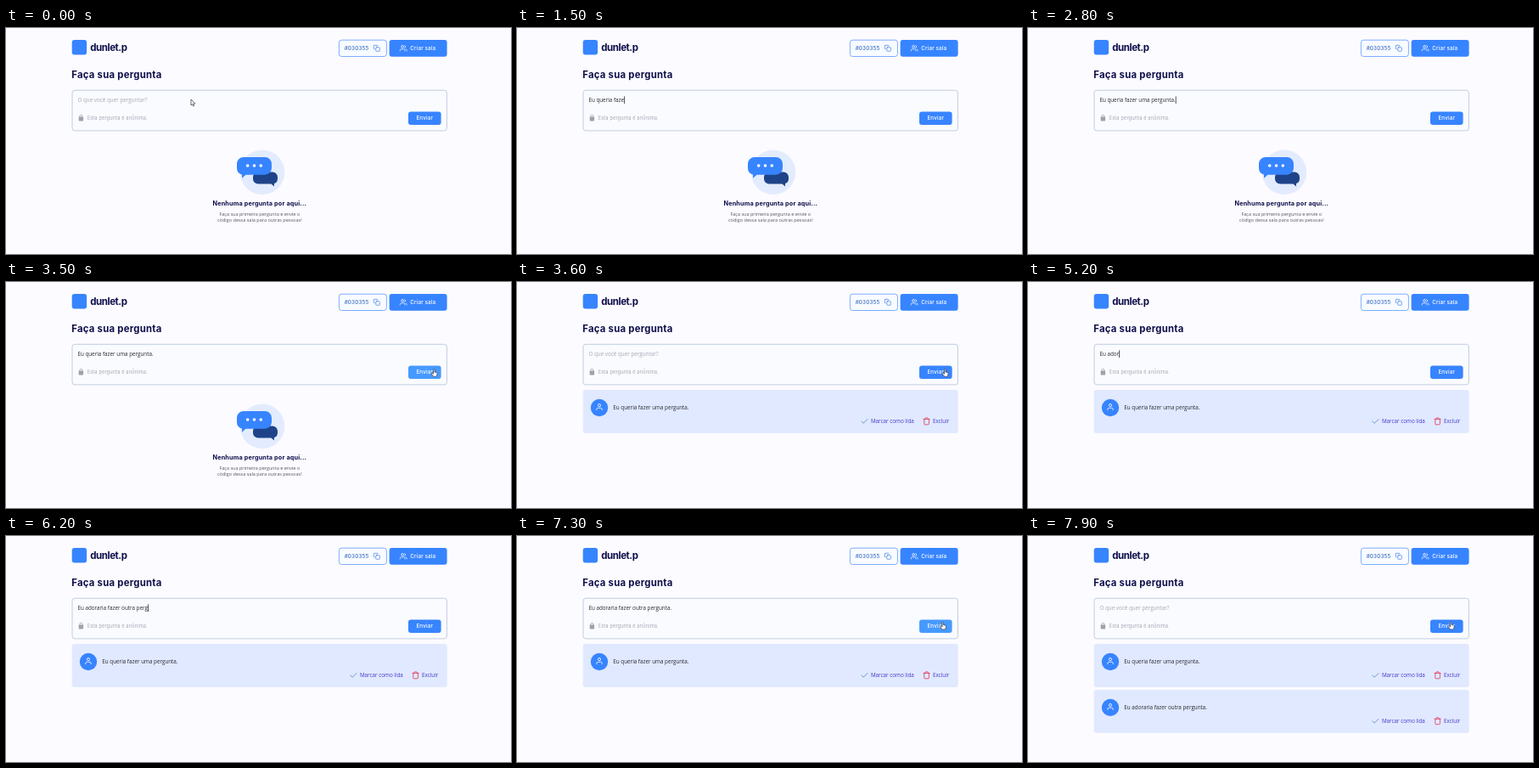
Recreate the animation shown at these times as an HTML page. Size 595 px wide and 266 px high, loop 8000 ms.

```html
<!DOCTYPE html>
<html lang="pt-BR">
<head>
<meta charset="utf-8">
<title>Perguntas</title>
<style>
  html, body { margin: 0; width: 100%; height: 100%; overflow: hidden; background: #fcfbff; }
  svg { display: block; width: 100%; height: 100%; }
  text { font: 6.31px "Open Sans", "Noto Sans", sans-serif; fill: #29292e; white-space: pre; }
  .ui { font-family: Inter, sans-serif; font-weight: 500; letter-spacing: .15px; }
  .title { font: 700 11.3px Inter, sans-serif; letter-spacing: .28px; fill: #0f0f4b; }
  .brand { font: 700 11.5px Inter, sans-serif; letter-spacing: -.45px; fill: #0f0f4b; }
  .sub { font: 700 7.3px Inter, sans-serif; letter-spacing: .14px; fill: #0f0f4b; text-anchor: middle; }
  .small { font-size: 5.52px; fill: #55555f; text-anchor: middle; }
  .note { font: 5.7px Inter, sans-serif; letter-spacing: .12px; fill: #a8a8b3; }
  .hint { fill: #a8a8b3; }
  .link { fill: #4338ca; }
  .white { fill: #fff; }
  .icon { fill: none; stroke-width: 2; stroke-linecap: round; stroke-linejoin: round; }
</style>
</head>
<body>
<svg id="stage" viewBox="0 0 595 266"></svg>
<script>
const LOOP = 8000, STEP = 100, EM = 6.31;
const BLUE = '#3784ff', HOVER = '#469aff', PALE = '#e0e9ff';
const FIRST = 'Eu queria fazer uma pergunta.';
const SECOND = 'Eu adoraria fazer outra pergunta.';

const ICONS = {
  users: 'M17 21v-2a4 4 0 0 0-4-4H5a4 4 0 0 0-4 4v2M23 21v-2a4 4 0 0 0-3-3.9M16 3.1a4 4 0 0 1 0 7.8M9 3a4 4 0 1 0 0 8a4 4 0 0 0 0-8',
  copy: 'M11 9h9a2 2 0 0 1 2 2v9a2 2 0 0 1-2 2h-9a2 2 0 0 1-2-2v-9a2 2 0 0 1 2-2zM5 15H4a2 2 0 0 1-2-2V4a2 2 0 0 1 2-2h9a2 2 0 0 1 2 2v1',
  user: 'M20 21v-2a4 4 0 0 0-4-4H8a4 4 0 0 0-4 4v2M12 3a4 4 0 1 0 0 8a4 4 0 0 0 0-8',
  check: 'M21 6L9 18l-6-6',
  trash: 'M3 6h18M19 6v14a2 2 0 0 1-2 2H7a2 2 0 0 1-2-2V6M8 6V4a2 2 0 0 1 2-2h4a2 2 0 0 1 2 2v2'
};

const text = (x, y, s, cls = '') => `<text x="${x}" y="${y}" class="${cls}">${s}</text>`;
const box = (x, y, w, h, fill, extra = '') =>
  `<rect x="${x}" y="${y}" width="${w}" height="${h}" rx="3" fill="${fill}" ${extra}/>`;
const icon = (name, cx, cy, size, color) =>
  `<path class="icon" d="${ICONS[name]}" stroke="${color}" transform="translate(${cx - size / 2} ${cy - size / 2}) scale(${size / 24})"/>`;

const card = (id, y, s) => `<g id="${id}" transform="translate(0 ${y})">
  ${box(77.7, 0, 442, 50.8, PALE)}
  <circle cx="97" cy="20.9" r="10.2" fill="${BLUE}"/>
  ${icon('user', 97, 20, 9.6, '#fff')}
  ${text(113.3, 23.1, s)}
  ${icon('check', 409.4, 36.8, 9.4, '#4d7fc4')}
  ${text(416.9, 39, 'Marcar como lida', 'link')}
  ${icon('trash', 482.6, 36.7, 9.6, '#e0345c')}
  ${text(490, 39, 'Excluir', 'link')}
</g>`;

const header = `
  ${box(77.7, 14, 17.4, 17.4, BLUE)}
  ${text(99.3, 26.8, 'dunlet.p', 'brand')}
  ${box(392.4, 14.2, 56, 19.3, '#f8fbff', 'stroke="#5c9aff" stroke-width=".8"')}
  <text class="ui" x="398.7" y="26" style="fill:#3f6fc4">#030355</text>
  ${icon('copy', 436.8, 23.8, 8.4, '#3f7fe8')}
  ${box(451.6, 13.9, 68, 19.9, BLUE)}
  ${icon('users', 468.2, 23.8, 8.6, '#fff')}
  ${text(476.3, 26, 'Criar sala', 'ui white')}`;

const form = `
  ${text(77.2, 59.3, 'Faça sua pergunta', 'title')}
  ${box(78, 73.3, 441.4, 47.6, '#f9fbff', 'stroke="#b4c2da" stroke-width=".8"')}
  <text id="field" x="84.4" y="86.9"></text>
  <rect id="caret" y="80.4" width=".7" height="8.6" fill="#111"/>
  <path d="M86.9 105v-1.2a1.5 1.5 0 0 1 3 0v1.2" fill="none" stroke="#a0a0ac" stroke-width=".8"/>
  <rect x="85.7" y="104.6" width="5.4" height="4.8" rx=".7" fill="#a0a0ac"/>
  ${text(95.7, 107.9, 'Esta pergunta é anônima.', 'note')}
  ${box(474, 98.5, 38.6, 15.4, BLUE, 'id="send"')}
  ${text(483.4, 108.3, 'Enviar', 'ui white')}`;

const empty = `<g id="empty">
  <circle cx="302" cy="169.8" r="26.3" fill="#e3ecfe"/>
  <path d="M297 169.5h17a6 6 0 0 1 6 6v1.8a6 6 0 0 1-4 5.8v3.4l-3.6-3H297a6 6 0 0 1-6-6v-2a6 6 0 0 1 6-6z" fill="#1f4389"/>
  <path d="M280 152h25a8 8 0 0 1 8 8v4.700a8 8 0 0 1-8 8h-22.500l-4.500 4v-4.300a8 8 0 0 1-6-7.700v-4.700a8 8 0 0 1 8-8z" fill="${BLUE}"/>
  <g fill="#fff"><circle cx="284.700" cy="162" r="1.800"/><circle cx="292.500" cy="162" r="1.800"/><circle cx="300.300" cy="162" r="1.800"/></g>
  ${text(298.8, 209.4, 'Nenhuma pergunta por aqui...', 'sub')}
  ${text(298.8, 220.8, 'Faça sua primeira pergunta e envie o', 'small')}
  ${text(298.8, 228.3, 'código dessa sala para outras pessoas!', 'small')}
</g>`;

const pointers = `<g fill="#fff" stroke="#33333d" stroke-width=".7" stroke-linejoin="round">
  <path id="arrow" d="M0 0v7l1.600-1.400 1.100 2.400 1-.5-1-2.300 2.100-.2z"/>
  <path id="hand" d="M-1-4.300c0-1 1.400-1 1.400 0v2.600l2.400.5q.9.3.7 1.300l-.5 2.600q-.2.9-1 .9h-2.400q-.6 0-1-.5l-2-2.600c-.5-.7.4-1.400 1-.9l1.400 1z"/>
</g>`;

const stage = document.getElementById('stage');
stage.innerHTML = header + form + empty + card('card1', 127.1, FIRST) + card('card2', 181, SECOND) + pointers;

const el = {};
for (const id of ['field', 'caret', 'send', 'empty', 'card1', 'card2', 'arrow', 'hand'])
  el[id] = document.getElementById(id);
const show = (node, on) => node.setAttribute('visibility', on ? 'visible' : 'hidden');

// Each path is a run of [time, x, y]; the pointer is hidden between paths.
const paths = [
  [[0, 218, 84], [500, 218, 84]],
  [[3000, 218, 84], [3400, 503, 106], [3500, 504.6, 107.6], [4000, 504.6, 107.6],
   [4200, 388.2, 100.6], [4500, 205, 88], [4600, 205, 88]],
  [[6900, 205, 88], [7200, 499, 105.5], [7300, 502, 106.4], [7800, 502, 106.4],
   [7900, 498.7, 106.3], [8000, 498.7, 106.3]]
];

function pointerAt(t) {
  const path = paths.find(p => t >= p[0][0] && t < p[p.length - 1][0]);
  if (!path) return null;
  const i = path.findIndex(p => p[0] > t);
  const [a, b] = [path[i - 1], path[i]];
  const k = (t - a[0]) / (b[0] - a[0]);
  return { x: a[1] + (b[1] - a[1]) * k, y: a[2] + (b[2] - a[2]) * k };
}

function typedAt(t) {
  if (t >= 700 && t < 3600)
    return FIRST.slice(0, t < 900 ? 1 : 2 + (t - 900) / 50);
  if (t >= 4800 && t < 7500) {
    const n = t <= 5700 ? 7 + (t - 5200) * .018 : 16 + (t - 5700) * 17 / 700;
    return SECOND.slice(0, Math.max(1, Math.round(n)));
  }
  return '';
}

const within = (t, a, b) => t >= a && t < b;
const caretOn = t => within(t, 500, 2500) || within(t, 2800, 3300) ||
  within(t, 4600, 6600) || within(t, 6900, 7200);

const pen = document.createElement('canvas').getContext('2d');
pen.font = '100px "Open Sans", "Noto Sans", sans-serif';

function render(t) {
  const typed = typedAt(t);
  el.field.textContent = typed || 'O que você quer perguntar?';
  el.field.setAttribute('class', typed ? '' : 'hint');
  el.caret.setAttribute('x', 84.4 + pen.measureText(typed).width * EM / 100);
  show(el.caret, caretOn(t));

  const sent = t >= 3600;
  show(el.empty, !sent);
  show(el.card1, sent);
  show(el.card2, t >= 7500);

  const p = pointerAt(t);
  const over = p && p.x > 474 && p.y > 98;
  const hand = over || within(t, 3600, 4600);
  show(el.arrow, p && !hand);
  show(el.hand, p && hand);
  if (p) (hand ? el.hand : el.arrow).setAttribute('transform', `translate(${p.x} ${p.y})`);
  el.send.setAttribute('fill', over && (t < 3600 || within(t, 6900, 7500)) ? HOVER : BLUE);
}

const start = performance.now();
function tick() {
  const t = (performance.now() - start) % LOOP;
  render(Math.floor(t / STEP) * STEP);
  requestAnimationFrame(tick);
}
tick();
</script>
</body>
</html>
```
